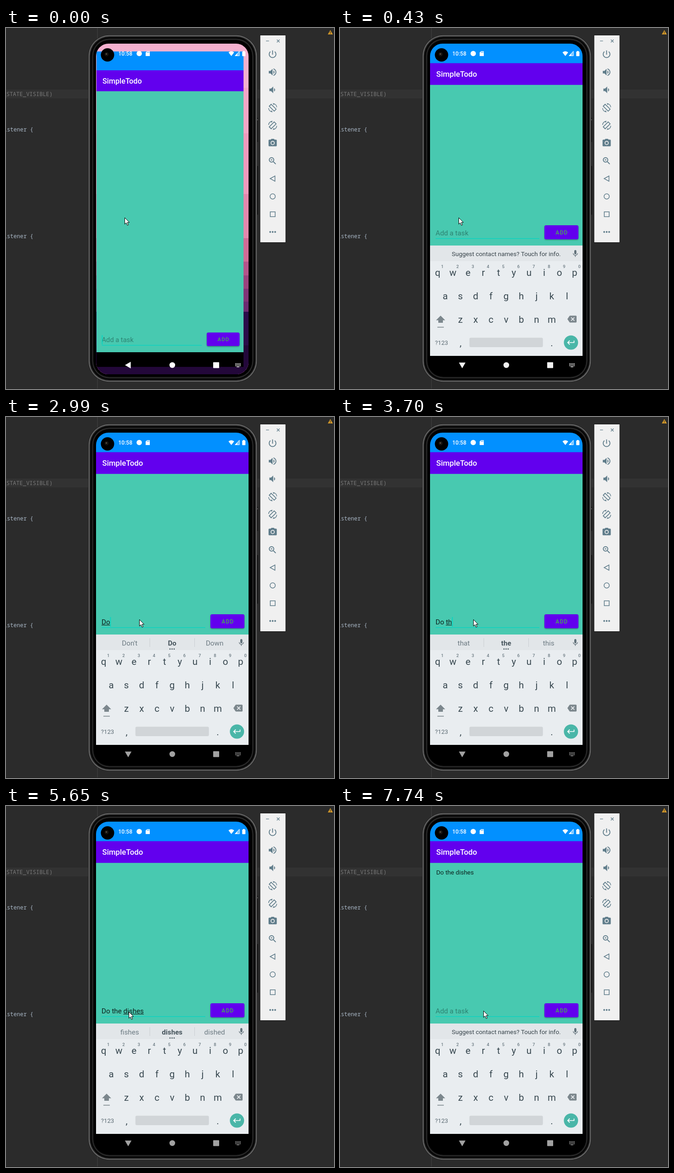
These frames come from a looping animation (714x785 px, 8000 ms). An HTML page with a canvas:

```html
<!DOCTYPE html>
<html lang="en">
<head>
<meta charset="utf-8">
<title>SimpleTodo</title>
<style>
html, body { margin: 0; width: 100%; height: 100%; overflow: hidden; background: #2b2b2b; }
canvas { display: block; width: 714px; height: 785px; }
</style>
</head>
<body>
<canvas id="stage"></canvas>
<script>
const W = 714, H = 785, LOOP = 8000;
const canvas = document.getElementById('stage');
const c = canvas.getContext('2d');
const dpr = window.devicePixelRatio || 1;
canvas.width = W * dpr;
canvas.height = H * dpr;

const SANS = 'Roboto, sans-serif';
const TEAL = '#48c9b0', PURPLE = '#6200ee', BLUE = '#0290ff', SLATE = '#607d8b';
const HINT = 'Add a task';

const ICON = {
  power: 'M13 3h-2v10h2V3zm4.83 2.17l-1.42 1.42C17.99 7.86 19 9.81 19 12c0 3.87-3.13 7-7 7s-7-3.13-7-7c0-2.19 1.01-4.14 2.58-5.42L6.17 5.17C4.23 6.82 3 9.26 3 12c0 4.97 4.03 9 9 9s9-4.03 9-9c0-2.74-1.23-5.18-3.17-6.83z',
  volUp: 'M3 9v6h4l5 5V4L7 9H3zm13.5 3c0-1.77-1.02-3.29-2.5-4.03v8.05c1.48-.73 2.5-2.25 2.5-4.02zM14 3.23v2.06c2.89.86 5 3.54 5 6.71s-2.11 5.85-5 6.71v2.06c4.01-.91 7-4.49 7-8.77s-2.99-7.86-7-8.77z',
  volDown: 'M18.5 12c0-1.77-1.02-3.29-2.5-4.03v8.05c1.48-.73 2.5-2.25 2.5-4.02zM5 9v6h4l5 5V4L9 9H5z',
  camera: 'M9 2L7.17 4H4c-1.1 0-2 .9-2 2v12c0 1.1.9 2 2 2h16c1.1 0 2-.9 2-2V6c0-1.1-.9-2-2-2h-3.17L15 2H9zm3 15c-2.76 0-5-2.24-5-5s2.24-5 5-5 5 2.24 5 5-2.24 5-5 5zM15.2 12a3.2 3.2 0 1 0-6.4 0 3.2 3.2 0 1 0 6.4 0z',
  zoom: 'M15.5 14h-.79l-.28-.27C15.41 12.59 16 11.11 16 9.5 16 5.91 13.09 3 9.5 3S3 5.91 3 9.5 5.91 16 9.5 16c1.61 0 3.09-.59 4.23-1.57l.27.28v.79l5 4.99L20.49 19l-4.99-5zm-6 0C7.01 14 5 11.99 5 9.5S7.01 5 9.5 5 14 7.01 14 9.5 11.99 14 9.5 14zm2.5-4h-2v2H9v-2H7V9h2V7h1v2h2v1z',
  mic: 'M12 14c1.66 0 2.99-1.34 2.99-3L15 5c0-1.66-1.34-3-3-3S9 3.34 9 5v6c0 1.66 1.34 3 3 3zm5.3-3c0 3-2.54 5.1-5.3 5.1S6.7 14 6.7 11H5c0 3.41 2.72 6.23 6 6.72V21h2v-3.28c3.28-.48 6-3.3 6-6.72h-1.7z',
  back: 'M22 3H7c-.69 0-1.23.35-1.59.88L0 12l5.41 8.11c.36.53.9.89 1.59.89h15c1.1 0 2-.9 2-2V5c0-1.1-.9-2-2-2zm-3 12.59L17.59 17 14 13.41 10.41 17 9 15.59 12.59 12 9 8.41 10.41 7 14 10.59 17.59 7 19 8.41 15.41 12 19 15.59z',
  enter: 'M19 7v4H5.83l3.58-3.59L8 6l-6 6 6 6 1.41-1.41L5.83 13H21V7z'
};
for (const k in ICON) ICON[k] = new Path2D(ICON[k]);
const ARROW = new Path2D('M.5 .5V14.6L3.8 11.6L6.2 17.2L8.5 16.2L6.1 10.8H10.6Z');

// time, x, y of the pointer tip
const POINTER = [
  [0, 258, 412], [700, 274, 350], [820, 298, 295], [970, 298, 358], [1120, 290, 400],
  [1240, 281, 432], [1390, 288, 437], [1540, 290, 440], [5650, 267, 447], [5770, 286, 452],
  [5890, 345, 456], [6010, 425, 450], [6130, 474, 444], [6250, 474, 446], [6370, 455, 530],
  [6520, 420, 528], [6640, 393, 510], [6790, 345, 465], [6910, 308, 430], [7060, 306, 432],
  [7180, 309, 439], [7300, 312, 445]
];

// time, field text, composing start, composing end
const TYPING = [
  [0, '', 0, 0], [2750, 'D', 0, 0], [2870, 'D', 0, 1], [2990, 'Do', 0, 2], [3270, 'Do ', 0, 0],
  [3550, 'Do t', 3, 4], [3700, 'Do th', 3, 5], [3850, 'Do the', 3, 6], [4160, 'Do the d', 0, 0],
  [4280, 'Do the di', 7, 8], [4400, 'Do the dis', 7, 9], [4550, 'Do the dis', 7, 10],
  [4830, 'Do the dish', 7, 10], [4980, 'Do the dish', 7, 11], [5130, 'Do the dishe', 7, 12],
  [5250, 'Do the dishes', 7, 13], [6250, '', 0, 0]
];

// time, words in the strip, whether the middle one is bold
const WORDS = [
  [0, ''], [2870, "Do D Don't"], [2990, "Don't Do Down", true], [3550, 'to t the'],
  [3700, 'that the this', true], [3850, 'they the then', true], [4280, 'day d did'],
  [4550, 'did dis disk'], [5130, 'fish dish disk', true], [5250, 'fishes dishes dished', true], [6250, '']
];

const CARET = [
  [0, 1], [430, 0], [970, 1], [1390, 0], [1940, 1], [2470, 0], [2750, 1],
  [5650, 0], [6250, 1], [6790, 0], [7180, 1], [7740, 0]
];

const at = (list, t) => list.filter(s => s[0] <= t).pop();

function rect(x, y, w, h, fill) {
  c.fillStyle = fill;
  c.fillRect(x, y, w, h);
}
function round(x, y, w, h, r, fill) {
  c.beginPath();
  c.roundRect(x, y, w, h, r);
  c.fillStyle = fill;
  c.fill();
}
function disc(x, y, r, fill) {
  c.beginPath();
  c.arc(x, y, r, 0, 7);
  c.fillStyle = fill;
  c.fill();
}
function poly(pts, fill, stroke) {
  c.beginPath();
  pts.forEach(([x, y]) => c.lineTo(x, y));
  c.closePath();
  if (fill) { c.fillStyle = fill; c.fill(); }
  if (stroke) { c.strokeStyle = stroke; c.stroke(); }
}
function text(str, x, y, font, fill, align = 'left') {
  c.font = font;
  c.fillStyle = fill;
  c.textAlign = align;
  c.fillText(str, x, y);
}
function icon(name, x, y, size, fill) {
  c.save();
  c.translate(x - size / 2, y - size / 2);
  c.scale(size / 24, size / 24);
  c.fillStyle = fill;
  c.fill(ICON[name]);
  c.restore();
}

function editor() {
  rect(0, 0, W, H, '#2b2b2b');
  rect(0, 134, W, 19, '#323232');
  rect(198.5, 0, 1, H, '#454545');
  rect(0, 784, W, 1, '#202020');
  const mono = '12px "Noto Sans Mono", monospace';
  text('_STATE_VISIBLE)', 101.5, 147.5, mono, '#787878', 'right');
  text('istener {', 59.5, 224.5, mono, '#a9b7c6', 'right');
  text('istener {', 59.5, 456.5, mono, '#a9b7c6', 'right');
  poly([[706, 4.5], [711.5, 14], [700.5, 14]], '#d69a28');
  rect(705.4, 7.5, 1.2, 3.4, '#2b2b2b');
  rect(705.4, 11.8, 1.2, 1.2, '#2b2b2b');
}

function phone() {
  round(545, 195, 3.5, 53, 1, '#111');
  round(545, 300, 3.5, 106, 1, '#0a0a0a');
  rect(546, 198, 1.5, 3, '#bbb');
  const layers = [[0, '#1c1c1c'], [.8, '#6c6c6c'], [2.5, '#3a3a3a'], [4, '#0c0c0c'],
    [6.5, '#060606'], [8.5, '#303030'], [10, '#181818'], [11.5, '#000']];
  for (const [d, fill] of layers) round(179 + d, 15 + d, 368 - 2 * d, 755 - 2 * d, 46 - d, fill);
}

function wallpaper() {
  const bands = [[34, '#f4b0cf'], [130, '#f2a6c6'], [229, '#ee9abc'], [361, '#e288ad'], [457, '#cf6c97'],
    [508, '#b4548a'], [538, '#9a437e'], [567, '#803476'], [595, '#6c2b70'], [617, '#2b0d4a'], [690, '#23083a']];
  for (const [y, fill] of bands) rect(196, y, 332, 753 - y, fill);
}

function statusIcons() {
  disc(221, 58.5, 14.5, '#000');
  disc(219, 57, 4.5, '#15120f');
  disc(218.5, 56.5, 1.6, '#5d5648');
  text('10:58', 244.5, 60, '500 12px ' + SANS, '#fff');
  disc(290, 55.5, 5.8, '#fff');
  poly([[307, 50.5], [313, 50.5], [313, 61], [304, 61], [304, 53.5]], '#fff');
  for (let i = 0; i < 3; i++) rect(307 + i * 1.9, 51.7, .9, 2.2, BLUE);
  c.beginPath();
  c.moveTo(490.5, 61);
  c.lineTo(484.3, 53);
  c.quadraticCurveTo(490.5, 48, 496.7, 53);
  c.closePath();
  c.fillStyle = '#fff';
  c.fill();
  c.lineWidth = 1;
  poly([[508, 50.5], [508, 60.5], [498.5, 60.5]], 'rgba(255,255,255,.45)', '#fff');
  poly([[503.5, 55.5], [503.5, 60.5], [498.5, 60.5]], '#fff');
  rect(516, 50, 3.4, 2, '#fff');
  round(514.2, 51.2, 7, 10, 1, '#fff');
}

function app(t, drop) {
  rect(196, 34, 332, 43, BLUE);
  rect(196, 76.5, 332, 48, PURPLE);
  rect(196, 123.7, 332, 350 + drop, TEAL);
  text('SimpleTodo', 209.5, t >= 150 && t < 280 ? 107 : 106.2, '500 16.8px ' + SANS, '#fff');
  if (t >= 6250) text('Do the dishes', 209.5, 149, '13.5px ' + SANS, '#0d231f');

  c.save();
  c.translate(0, drop);
  const font = '15.2px ' + SANS;
  const [, str, from, to] = at(TYPING, t);
  rect(208, 457, 226, 1.6, '#12d3bf');
  text(str || HINT, 208, 451, font, str ? '#0c1f1b' : '#2d8372');
  const wide = n => c.measureText(str.slice(0, n)).width;
  if (to) rect(208 + wide(from), 452, wide(to) - wide(from), 1.1, '#0c1f1b');
  if (at(CARET, t)[1]) rect(208 + wide(str.length), 435, 1.7, 21, '#06d6c2');

  c.shadowColor = 'rgba(0,0,0,.35)';
  c.shadowBlur = 3 * dpr;
  c.shadowOffsetY = 1.3 * dpr;
  round(445, 429, 74, 30.5, 3.5, PURPLE);
  c.shadowColor = 'transparent';
  if (t >= 6130 && t < 6640) {
    round(445, 429, 74, 30.5, 3.5, `rgba(255,255,255,${t < 6370 ? .22 : t < 6520 ? .14 : .07})`);
  }
  c.letterSpacing = '1.1px';
  text('ADD', 469.3, 449, '500 12px ' + SANS, '#46ad55');
  c.letterSpacing = '0px';
  c.restore();
}

function strip(t) {
  rect(196, 473, 332, 34, '#e2e6e9');
  const [, words, bold] = at(WORDS, t);
  icon('mic', 512.3, 490.5, 18.5, '#5f6f78');
  if (!words) {
    text('Suggest contact names? Touch for info.', 362, 496.3, '13.4px ' + SANS, '#37434a', 'center');
    return;
  }
  words.split(' ').forEach((w, i) => {
    const mid = i === 1;
    text(w, 269.3 + i * 92.4, 497, (mid && bold ? 'bold ' : '') + '15.2px ' + SANS, mid ? '#46545c' : '#6c7a82', 'center');
  });
  rect(312.5, 481, 1, 19, '#c9ced2');
  rect(410, 481, 1, 19, '#c9ced2');
  for (let i = -1; i < 2; i++) disc(361.5 + i * 4.5, 504.5, 1.3, '#37474f');
}

function keyboard(t) {
  rect(196, 473, 332, 240, '#e9edf0');
  strip(t);
  const key = '20.5px ' + SANS, ink = '#37474f', gray = '#7c878d';
  const row = (keys, x, y) => [...keys].forEach((k, i) => text(k, x + i * 33.15, y, key, ink, 'center'));
  row('qwertyuiop', 212.5, 539.3);
  row('asdfghjkl', 229, 590);
  row('zxcvbnm', 262.2, 640.7);
  [...'1234567890'].forEach((n, i) => text(n, 222.8 + i * 33.15, 521.7, '500 9.5px ' + SANS, '#6b7a82', 'center'));

  poly([[219, 625.5], [229, 635.5], [224, 635.5], [224, 641], [214, 641], [214, 635.5], [209, 635.5]], gray);
  rect(212, 649.8, 14, 1.6, gray);
  icon('back', 505, 633, 20, gray);
  text('?123', 221, 688.7, '13.2px ' + SANS, '#5c6b73', 'center');
  text(',', 262.5, 691.5, key, ink, 'center');
  text('.', 461, 691.5, key, ink, 'center');
  round(281.7, 673.5, 160, 20.5, 3, '#d1d5d8');
  disc(502.8, 684, 15.5, '#4ab6a8');
  icon('enter', 502.8, 684, 20, '#fff');
}

function navIcons(t) {
  const fade = Math.min(1, Math.max(0, (t - 280) / 1000));
  const v = Math.round(255 - 93 * fade), fill = `rgb(${v},${v},${v})`;
  c.save();
  c.translate(266, 733);
  c.rotate(-Math.PI / 180 * (t < 150 ? 0 : t < 280 ? 38 : t < 430 ? 84 : 90));
  poly([[-7, 0], [5.5, -7.2], [5.5, 7.2]], fill);
  c.restore();
  disc(362, 733, 6.2, fill);
  round(451, 726.8, 13, 12.6, 1, fill);
  for (let r = 0; r < 3; r++)
    for (let i = 0; i < 5; i++) rect(499 + i * 2.6, 729 + r * 2.4, 1.6, 1.5, fill);
  rect(502, 736.2, 6, 1.3, fill);
}

function screen(t) {
  c.save();
  c.beginPath();
  c.roundRect(196, 34, 332, 719, 27);
  c.clip();
  if (t < 150) {
    wallpaper();
    c.save();
    c.translate(197, 51);
    c.scale(.964, .964);
    c.translate(-196, -34);
    app(t, 239);
    rect(196, 712.5, 332, 33, '#000');
    c.restore();
  } else {
    rect(196, 34, 332, 719, '#000');
    app(t, 0);
    if (t < 280) {
      rect(196, 34, 332, 1.2, '#cf8fb4');
      rect(196, 751.5, 332, 1, '#1c0a2c');
      rect(196, 473, 332, 18, '#fff');
    }
    c.save();
    c.translate(0, t < 280 ? 17.7 : 0);
    keyboard(t);
    c.restore();
  }
  statusIcons();
  navIcons(t);
  c.restore();
}

function rotateIcon(y, dir) {
  c.save();
  c.translate(580.5, y);
  c.scale(dir, 1);
  c.lineWidth = 1.7;
  poly([[-3.3, -7.5], [7.5, 3.2], [3.3, 7.5], [-7.5, -3.2]], null, SLATE);
  c.lineWidth = 1.4;
  c.beginPath();
  c.arc(0, 0, 9, -1.3, -.1);
  c.moveTo(-2.3, 8.7);
  c.arc(0, 0, 9, 1.84, 3.04);
  c.stroke();
  poly([[0, -10], [4.5, -8.6], [2.2, -5.8]], SLATE);
  poly([[0, 10], [-4.5, 8.6], [-2.2, 5.8]], SLATE);
  c.restore();
}

function toolbar() {
  rect(552.5, 15, 57, 452, '#151515');
  rect(553.5, 16, 55, 450, '#f0f0f0');
  rect(566, 27.6, 6.5, 1.2, SLATE);
  c.strokeStyle = SLATE;
  c.lineWidth = 1.3;
  c.beginPath();
  c.moveTo(589.6, 25.2); c.lineTo(595.6, 31.2);
  c.moveTo(595.6, 25.2); c.lineTo(589.6, 31.2);
  c.stroke();
  icon('power', 580.3, 57, 22, SLATE);
  icon('volUp', 580.3, 96, 22, SLATE);
  icon('volDown', 579.8, 134.5, 22, SLATE);
  rotateIcon(173.3, 1);
  rotateIcon(211.7, -1);
  icon('camera', 580.5, 250, 21.5, SLATE);
  icon('zoom', 580.3, 289, 21.5, SLATE);
  c.lineWidth = 1.5;
  poly([[575, 327.5], [585.5, 321.8], [585.5, 333.2]], null, SLATE);
  c.beginPath();
  c.arc(580.5, 366.3, 5.7, 0, 7);
  c.stroke();
  c.strokeRect(575.3, 399.7, 10.6, 10.6);
  for (let i = -1; i < 2; i++) disc(580.5 + i * 5.4, 443.5, 1.9, SLATE);
}

function pointer(t) {
  const [, x, y] = at(POINTER, t);
  c.save();
  c.translate(x, y);
  c.fillStyle = '#fff';
  c.fill(ARROW);
  c.strokeStyle = '#000';
  c.lineWidth = 1;
  c.stroke(ARROW);
  c.restore();
}

const start = performance.now();
function draw() {
  const t = (performance.now() - start) % LOOP;
  c.setTransform(dpr, 0, 0, dpr, 0, 0);
  editor();
  phone();
  screen(t);
  toolbar();
  pointer(t);
  requestAnimationFrame(draw);
}
draw();
</script>
</body>
</html>
```
